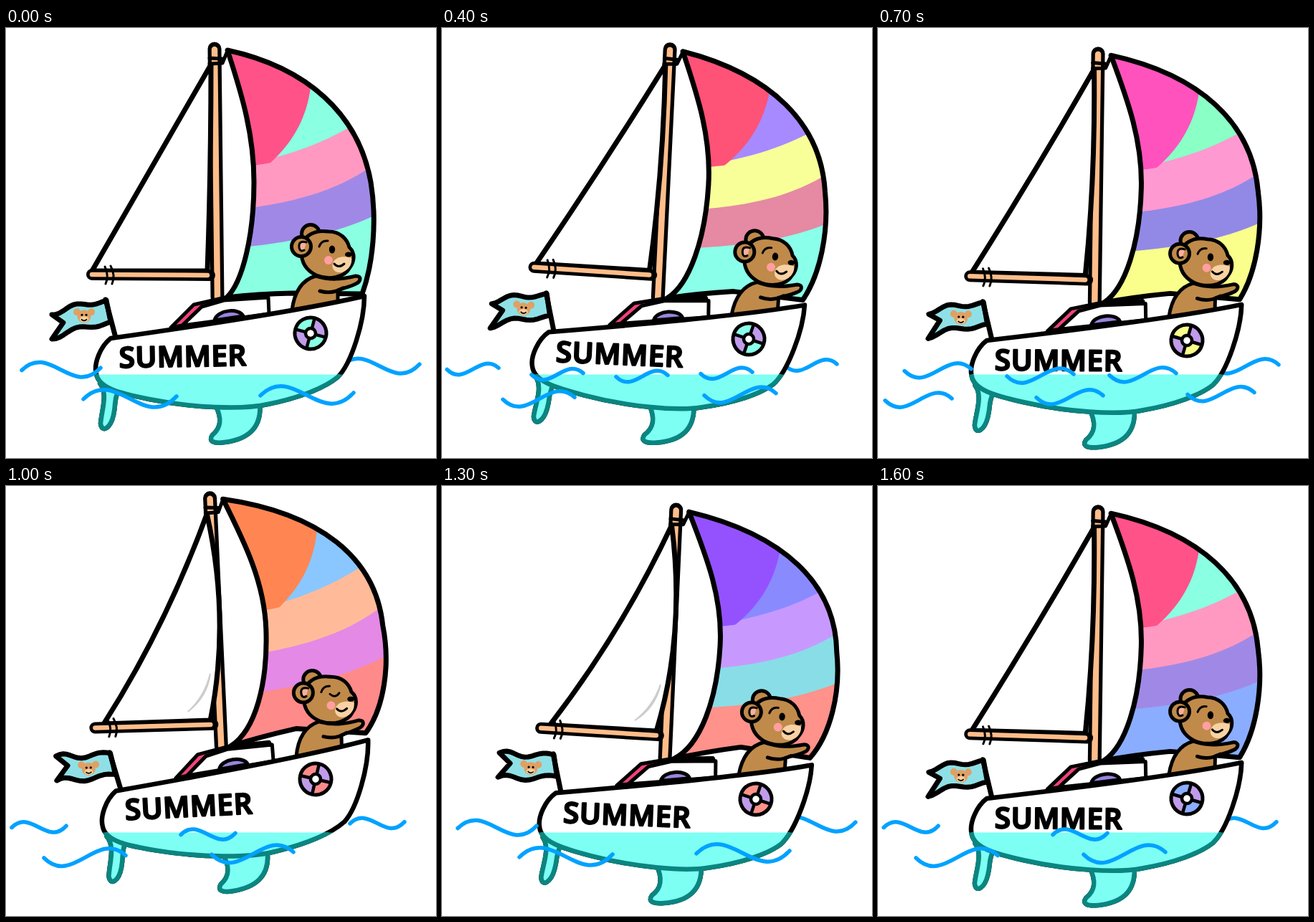
An HTML page for the animation above (1.7 s loop, 600x600 px).

```html
<!DOCTYPE html>
<html lang="en">
<head>
<meta charset="utf-8">
<title>Sailing bear</title>
<style>
  html, body { margin: 0; width: 100%; height: 100%; overflow: hidden; background: #fff; }
  svg { display: block; width: 100vw; height: 100vh; }
  .ink { stroke: #000; stroke-width: 7; stroke-linecap: round; stroke-linejoin: round; }
  .mid { stroke-width: 5; }
  .thin { stroke-width: 3; }
  .line { fill: none; }
  .fur { fill: #c08a4a; }
  .wood { stroke: #ffbd8a; stroke-linecap: round; }
  .wave { fill: none; stroke: #00a2ff; stroke-width: 5.5; stroke-linecap: round; }
  text { font: 600 40px "Open Sans", sans-serif; letter-spacing: .8px; }
</style>
</head>
<body>
<svg viewBox="0 0 600 600">
  <defs>
    <clipPath id="sea"><rect y="483.5" width="600" height="117"/></clipPath>
    <clipPath id="sailClip"><path id="sailShape"/></clipPath>
    <g id="hull" stroke-width="6.5" stroke-linejoin="round" stroke-linecap="round">
      <path d="M131 496C143 510 133 535 132 552C134 566 146 558 150 540C154 522 150 520 157 505Z"/>
      <path d="M292 526C302 545 300 558 288 568C282 577 290 580 305 578C335 574 358 560 354 522Z"/>
      <path d="M146 433C132 444 122 468 126 483C130 503 160 510 200 518C260 530 330 533 365 525C410 516 445 502 463 487C482 468 500 410 500 374C440 388 330 407 146 433Z"/>
    </g>
  </defs>

  <path id="backWaves" class="wave"/>

  <g class="boat">
    <path id="flag" class="ink" fill="#8fe0e6"/>
    <path class="ink line" d="M139 379L153 432"/>
    <g id="badge">
      <g fill="#e0a064">
        <circle cx="-10" cy="-6" r="5"/><circle cx="10" cy="-6" r="5"/><ellipse rx="9.5" ry="9"/>
      </g>
      <ellipse cy="4" rx="6" ry="4" fill="#f5cfa0"/>
      <circle cx="-3" cy="-2" r="1.6"/><circle cx="3" cy="-2" r="1.6"/>
      <path d="M-4 4Q0 8 4 4" fill="none" stroke="#000" stroke-width="1.6"/>
    </g>

    <g clip-path="url(#sailClip)">
      <rect id="foot" x="290" y="20" width="260" height="365"/>
      <g id="bands">
        <path d="M270 0H560V236C500 275 430 301 270 311Z"/>
        <path d="M270 0H560V150C490 222 420 246 270 259Z"/>
        <path d="M270 0H560V80C490 140 420 183 270 200Z"/>
        <path d="M270 0H422L425 83C420 120 405 155 369 188Q340 194 270 200Z"/>
      </g>
    </g>
    <path id="sailEdge" class="ink line"/>

    <path class="ink line" d="M291 29L295 376" style="stroke-width:19"/>
    <path class="wood" d="M291 30L295 376" stroke-width="8.5"/>
    <path id="jib" class="ink" fill="#fff"/>
    <path id="fold" d="M250 326Q274 306 283 274Q278 306 250 326Z" fill="#ccc" stroke="#ccc" stroke-width="2"/>
    <path class="ink line mid" d="M284 42L302 43M284 50L302 49L309 32"/>
    <path class="ink line" d="M120 344L284 345" style="stroke-width:16"/>
    <path class="wood" d="M120 344L281 345" stroke-width="6.5"/>
    <path class="ink line thin" d="M138 333Q144 346 139 357M146 332Q153 345 148 357"/>

    <path class="ink mid" fill="#f0427f" d="M230 418L262 386L306 376L362 372L364 377L273 389L246 415Z"/>
    <path class="ink mid" fill="#fff" d="M246 415L273 389L304 380L366 376L367 399Z"/>
    <path class="ink mid" fill="#9a84dc" d="M291 408C294 393 326 390 331 402Z"/>

    <g class="ink mid">
      <circle class="fur" cx="425" cy="287" r="12.5"/>
      <path class="fur" d="M399 394C402 370 412 352 432 346C452 352 468 351 488 346C497 346 495 354 488 357C478 362 470 363 463 366L463 392Z"/>
      <path class="line" d="M438 367Q455 372 470 363"/>
      <path class="fur" d="M412 312C412 290 430 281 450 284C466 284 476 294 479 306C488 314 486 326 480 334C472 349 450 352 433 345C418 338 412 326 412 312Z"/>
      <circle class="fur" cx="412" cy="305" r="13.5"/>
      <path class="thin" fill="#f7b09c" d="M419 299Q408 296 409 306Q410 313 416 310"/>
      <g stroke="none">
        <path d="M456 328C460 318 473 318 482 321C484 332 474 342 464 341C457 340 454 334 456 328Z" fill="#f8d2a4"/>
        <circle cx="450" cy="324" r="6" fill="#ff9f9f"/>
        <ellipse cx="478" cy="316" rx="5" ry="3.6"/>
        <ellipse id="eyeOpen" cx="455" cy="309" rx="4.2" ry="5.5"/>
      </g>
      <path class="line thin" d="M437 305Q440 296 449 297M458 329Q464 336 472 329"/>
      <path id="eyeShut" class="line thin" d="M449 308Q456 315 462 307"/>
    </g>

    <use href="#hull" fill="#fff" stroke="#000"/>
    <text transform="translate(158 474) rotate(-1)" stroke="#000" stroke-width="2.4" stroke-linejoin="round">SUMMER</text>
    <g transform="translate(425 426) rotate(15)" fill="none">
      <circle r="15" stroke="#c09bea" stroke-width="15"/>
      <circle id="ring" r="15" stroke-width="15" stroke-dasharray="23.56"/>
      <path d="M-22 0H22M0 -22V22" stroke="#000" stroke-width="4.5"/>
      <circle r="7" fill="#fff" stroke="#000" stroke-width="4.5"/>
      <circle r="22" stroke="#000" stroke-width="5"/>
    </g>
  </g>

  <g clip-path="url(#sea)">
    <g class="boat"><use href="#hull" fill="#7dfff4" stroke="#0a8580"/></g>
  </g>
  <path id="frontWaves" class="wave"/>
</svg>

<script>
const $ = id => document.getElementById(id);
const set = (id, name, value) => $(id).setAttribute(name, value);
const show = (id, on) => set(id, 'visibility', on ? 'visible' : 'hidden');
const STEP = 100, COUNT = 17;

// Key poses; hues are top, upper, band and foot of the sail.
const keys = [
  { at: 0, x: 0, y: 0, tilt: 0, belly: 0, hues: [341, 165, 336, 165] },
  { at: 2, x: 0, y: -10, tilt: 0, belly: 1, hues: [341, 165, 336, 0] },
  { at: 4, x: 3, y: 8, tilt: 3.45, belly: 1, hues: [347, 255, 64, 169] },
  { at: 7, x: 6, y: 10, tilt: 1.45, belly: 1, hues: [323, 151, 327, 63] },
  { at: 10, x: 7, y: -17, tilt: -1.95, belly: 1.7, hues: [18, 209, 20, 0] },
  { at: 13, x: 13, y: 11, tilt: 3.25, belly: 1.7, hues: [263, 240, 267, 4] },
  { at: 16, x: 6, y: 10, tilt: 1.45, belly: 1, hues: [341, 165, 336, 222] }
];

// Smooth curve through the key poses, wrapping round the loop.
function poseAt(i) {
  const n = keys.findLastIndex(k => k.at <= i), size = keys.length;
  const [a, b, c, d] = [-1, 0, 1, 2].map(j => {
    const k = keys[(n + j + size) % size];
    return { ...k, at: k.at + Math.floor((n + j) / size) * COUNT };
  });
  const span = c.at - b.at, t = (i - b.at) / span, ease = t * t * (3 - 2 * t);
  const curve = p => {
    const m0 = (c[p] - a[p]) / (c.at - a.at), m1 = (d[p] - b[p]) / (d.at - b.at);
    return b[p] + (c[p] - b[p]) * ease + span * t * (1 - t) * (m0 * (1 - t) - m1 * t);
  };
  return { x: curve('x'), y: curve('y'), tilt: curve('tilt'), belly: curve('belly'), hues: b.hues };
}

// Each swell has an upper and a lower row: first x, spacing, width (negative starts with a trough).
const swells = {
  A: [[22, 445, 110], [108, 247, 130]],
  B: [[37, 143, -93], [10, 211, -93]],
  C: [[7, 118, -72], [85, 281, -100]],
  D: [[8, 236, 76], [53, 234, -114]]
};
const swellOrder = 'AABBCDABCCDDAABCD';
const seaLevel = [
  x => 476 + 20 * Math.sin(Math.PI * x / 600) - x * .035,
  x => 520 - x * .02
];

function drawSea(swell) {
  let back = '', front = '';
  swells[swell].forEach(([start, gap, width], row) => {
    const w = Math.abs(width), s = width * .35;
    for (let x = start; x < 500; x += gap) {
      const d = `M${x} ${seaLevel[row](x)}c${w * .35} ${-s} ${w * .65} ${s} ${w} ${-w * .03}`;
      if (x > 460) back += d; else front += d;
    }
  });
  set('backWaves', 'd', back);
  set('frontWaves', 'd', front);
}

function sailPath(b) {
  const l = 346 + 10 * b, r = 509 + 10 * b;
  return `M309 31C${330 + 5 * b} 95 ${l} 150 ${l} 215C${l} 290 ${330 + 8 * b} 355 308 376` +
    `Q350 ${371 - 4 * b} 400 ${370 - 9 * b}L497 ${371 - 4 * b}` +
    `C${512 + 7 * b} 330 ${518 + 10 * b} 270 ${r} 215` +
    `C${492 + 16 * b} 120 ${420 + 14 * b} 55 309 31Z`;
}

const jibPath = g =>
  `M286 51Q${203 + 20 * g} ${195 + 12 * g} ${120 + 12 * g} 339L281 339Q${286 + 28 * g} 200 286 51Z`;

function drawFlag(gust) {
  const edge = u => 380 + (16 - 12 * gust) * u + 5 * Math.sqrt(u) * Math.sin(8.5 * u - 2.7 * gust);
  const point = (u, drop) => [140 - 76 * u + drop * .2 * (1 - u), edge(u) + drop];
  const us = Array.from({ length: 16 }, (_, n) => n / 15);
  const top = us.map(u => point(u, 0));
  const low = us.map(u => point(u, 30 + 4 * u)).reverse();
  set('flag', 'd', 'M' + [...top, point(.8, 16), ...low].join('L') + 'Z');
  set('badge', 'transform', `translate(109 ${edge(.42) + 17})`);
}

function paint([top, upper, band, foot]) {
  const hsl = (h, l, s = 100) => `hsl(${h} ${s}% ${l}%)`;
  const fills = [hsl(band - 81, 72, 65), hsl(band, 80), hsl(upper, 77), hsl(top, 66)];
  fills.forEach((fill, n) => $('bands').children[n].setAttribute('fill', fill));
  set('foot', 'fill', hsl(foot, 77));
  set('ring', 'stroke', hsl(foot, 77));
}

function draw(i) {
  const { x, y, tilt, belly, hues } = poseAt(i);
  const gust = (belly / 1.7) ** 3, sail = sailPath(belly);
  for (const g of document.querySelectorAll('.boat'))
    g.setAttribute('transform', `translate(${x} ${y}) rotate(${tilt} 425 426)`);
  set('sailShape', 'd', sail);
  set('sailEdge', 'd', sail);
  set('bands', 'transform', `translate(${8 * belly} ${-2 * belly})`);
  set('jib', 'd', jibPath(gust));
  show('fold', gust > .8);
  drawFlag(gust);
  paint(hues);
  const shut = i > 8 && i < 13;
  show('eyeOpen', !shut);
  show('eyeShut', shut);
  drawSea(swellOrder[i]);
}

let shown = -1;
function tick() {
  const i = Math.floor(performance.now() / STEP) % COUNT;
  if (i !== shown) draw(shown = i);
  requestAnimationFrame(tick);
}
tick();
</script>
</body>
</html>
```
